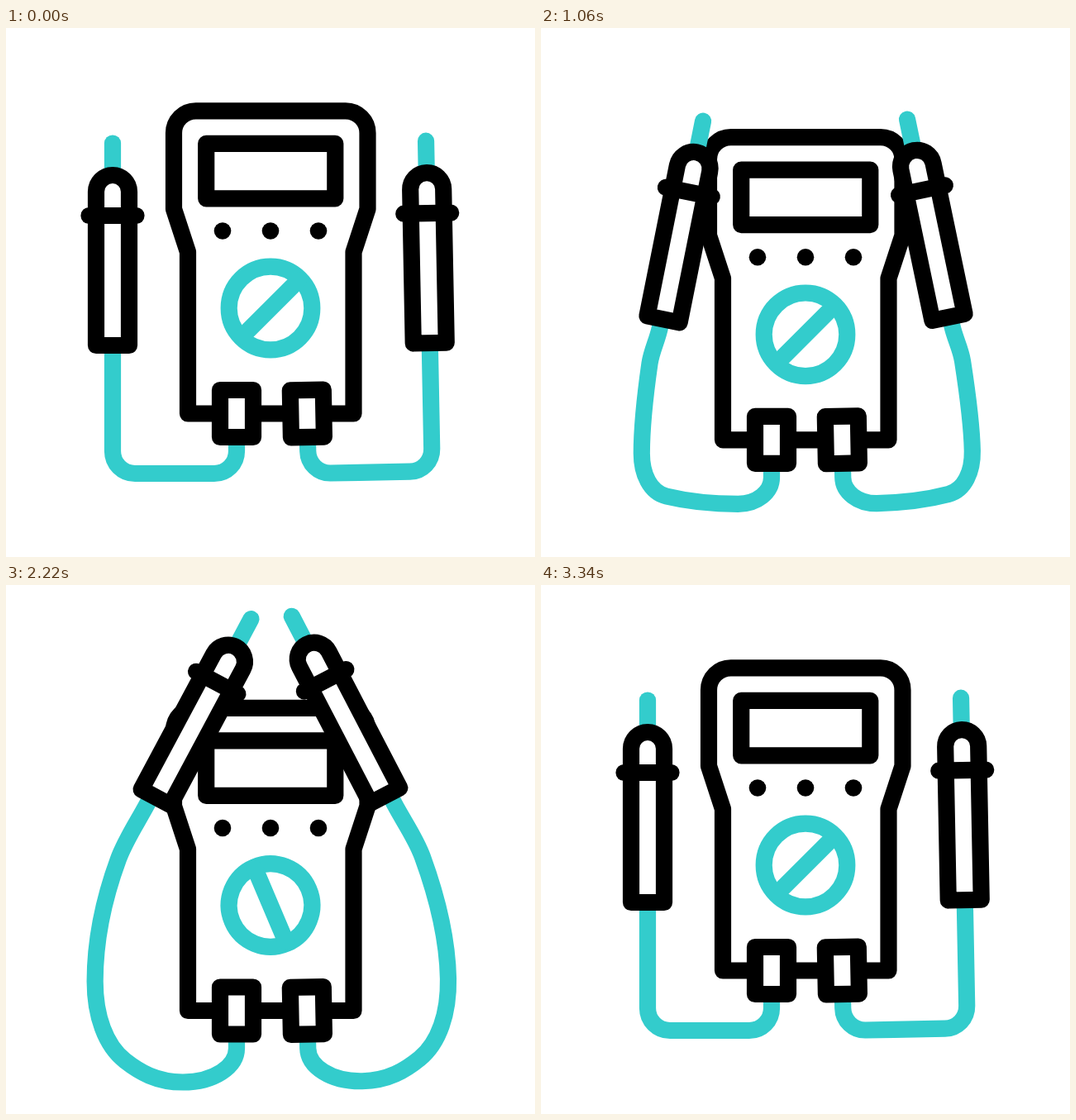
An HTML page with a canvas for the animation above (3.6 s loop, 640x640 px).

```html
<!DOCTYPE html>
<html>
<head>
<meta charset="utf-8">
<style>
html, body { margin: 0; width: 100%; height: 100%; overflow: hidden; background: #fff; }
canvas { display: block; }
</style>
</head>
<body>
<canvas id="stage" width="640" height="640"></canvas>
<script>
const ctx = document.getElementById('stage').getContext('2d');
const LOOP = 3600, TEAL = '#3cc', BLACK = '#000', RAD = Math.PI / 180;

const shape = {
  body: new Path2D('M203 219V127A26.7 26.7 0 0 1 229.7 100.3H410.8A26.7 26.7 0 0 1 437.5 127V219L420.5 271V466.5H220V271Z'),
  screen: new Path2D('M242.2 139.8H398.3V206.3H242.2Z'),
  dial: new Path2D('M50.3 0A50.3 50.3 0 1 1 -50.3 0A50.3 50.3 0 1 1 50.3 0'),
  socket: new Path2D('M259 438H299V495H259Z'),
  tip: new Path2D('M0 -254.5V-215'),
  probe: new Path2D('M-20 -10V-196A20 20 0 0 1 20 -196V-10Z'),
  collar: new Path2D('M-28.5 -167H28.5'),
  bolt: new Path2D('M295 29L232 34L251 53L187 58')
};
const BOLT_LENGTH = 154;

// Keyframes as [time, value], eased with a half cosine.
const keys = {
  lift: [[240, 0], [560, -41], [1260, 48.5], [2940, 48.5], [3340, 0]],
  reach: [[840, 0], [1380, 1], [2700, 1], [3340, 0]],
  open: [[1380, 0], [1540, 11], [1723, 0], [1960, 12], [2365, 0]],
  dial: [[1240, -45], [1940, 67], [2700, 67], [3340, -45]]
};

function valueAt(track, t) {
  if (t <= track[0][0]) return track[0][1];
  for (let i = 1; i < track.length; i++) {
    const [t0, a] = track[i - 1], [t1, b] = track[i];
    if (t < t1) return a + (b - a) * (1 - Math.cos(Math.PI * (t - t0) / (t1 - t0))) / 2;
  }
  return track[track.length - 1][1];
}

const ramp = (t, from, to) => Math.min(1, Math.max(0, (t - from) / (to - from)));

function line(path, color = BLACK) {
  ctx.strokeStyle = color;
  ctx.stroke(path);
}

function box(path) {
  ctx.fill(path);
  line(path);
}

function group(draw) {
  ctx.save();
  draw();
  ctx.restore();
}

function cable(x, y, angle, u, open) {
  const dir = (a, r) => [Math.cos(a * RAD) * r, Math.sin(a * RAD) * r];
  const add = (p, d, k = 1) => [p[0] + d[0] * k, p[1] + d[1] * k];
  const start = [x - 6 * u, y];
  const upper = [129 + 7 * u, 425 - 142 * u];
  const side = [129 - 20 * u - 0.4 * open, 512 - 81 * u];
  const corner = [156 - 12 * u, 539 - 12 * u];
  const low = [252 - 38 * u, 539 + 14 * u];
  const end = [279, 512];
  const out = dir(90 + angle, 1), bend = dir(90 + angle * 0.72, 1), turn = dir(38 * u, 1);
  const p = new Path2D();
  const curve = (a, b, c) => p.bezierCurveTo(...a, ...b, ...c);
  p.moveTo(...add(start, out, -8));
  p.lineTo(...start);
  curve(add(start, out, 10 + 15 * u), add(upper, bend, -10 - 15 * u), upper);
  curve(add(upper, bend, 25 + 25 * u), add(side, [0, -25 - 25 * u]), side);
  curve(add(side, [0, 15 + 27 * u]), add(corner, turn, -15 - 15 * u), corner);
  curve(add(corner, turn, 22), add(low, [-32, 0]), low);
  curve(add(low, [15 + 23 * u, 0]), add(end, [0, 15 + 7 * u]), end);
  p.lineTo(279, 495);
  line(p, TEAL);
}

function lead(u, open, tilt) {
  const x = 129 + (47.5 - tilt) * u, y = 394 - 177 * u;
  const angle = (31.5 - 1.6 * tilt) * u - open;
  cable(x, y, angle, u, open);
  box(shape.socket);
  group(() => {
    ctx.translate(x, y);
    ctx.rotate(angle * RAD);
    line(shape.tip, TEAL);
    box(shape.probe);
    line(shape.collar);
  });
}

function meter(dialAngle) {
  box(shape.body);
  box(shape.screen);
  ctx.fillStyle = BLACK;
  for (const x of [262, 320, 378]) {
    ctx.beginPath();
    ctx.arc(x, 245.5, 10.3, 0, 7);
    ctx.fill();
  }
  ctx.fillStyle = '#fff';
  group(() => {
    ctx.translate(320, 339);
    ctx.rotate(dialAngle * RAD);
    line(shape.dial, TEAL);
    line(new Path2D('M-48 0H48'), TEAL);
  });
}

function sparks(t, start) {
  const head = ramp(t, start, start + 160) * BOLT_LENGTH;
  const tail = ramp(t, start + 180, start + 370) * BOLT_LENGTH;
  if (head <= tail) return;
  group(() => {
    ctx.setLineDash([head - tail, 999]);
    ctx.lineDashOffset = -tail;
    line(shape.bolt, TEAL);
    ctx.translate(630, 2);
    ctx.scale(-1, 1);
    line(shape.bolt, TEAL);
  });
}

function render(t) {
  const u = valueAt(keys.reach, t), open = valueAt(keys.open, t);
  ctx.fillStyle = '#fff';
  ctx.fillRect(0, 0, 640, 640);
  ctx.lineWidth = 20.2;
  ctx.lineCap = ctx.lineJoin = 'round';
  group(() => {
    ctx.translate(0, valueAt(keys.lift, t));
    meter(valueAt(keys.dial, t));
    lead(u, open, 0);
    // The right lead is a mirror image, tilted slightly around its socket.
    ctx.translate(365, 500);
    ctx.rotate(-1.1 * RAD);
    ctx.scale(-1, 1);
    ctx.translate(-279, -500);
    lead(u, open, 1.1);
  });
  sparks(t, 1400);
  sparks(t, 2400);
}

const began = performance.now();
function tick() {
  render((performance.now() - began) % LOOP);
  requestAnimationFrame(tick);
}
tick();
</script>
</body>
</html>
```
